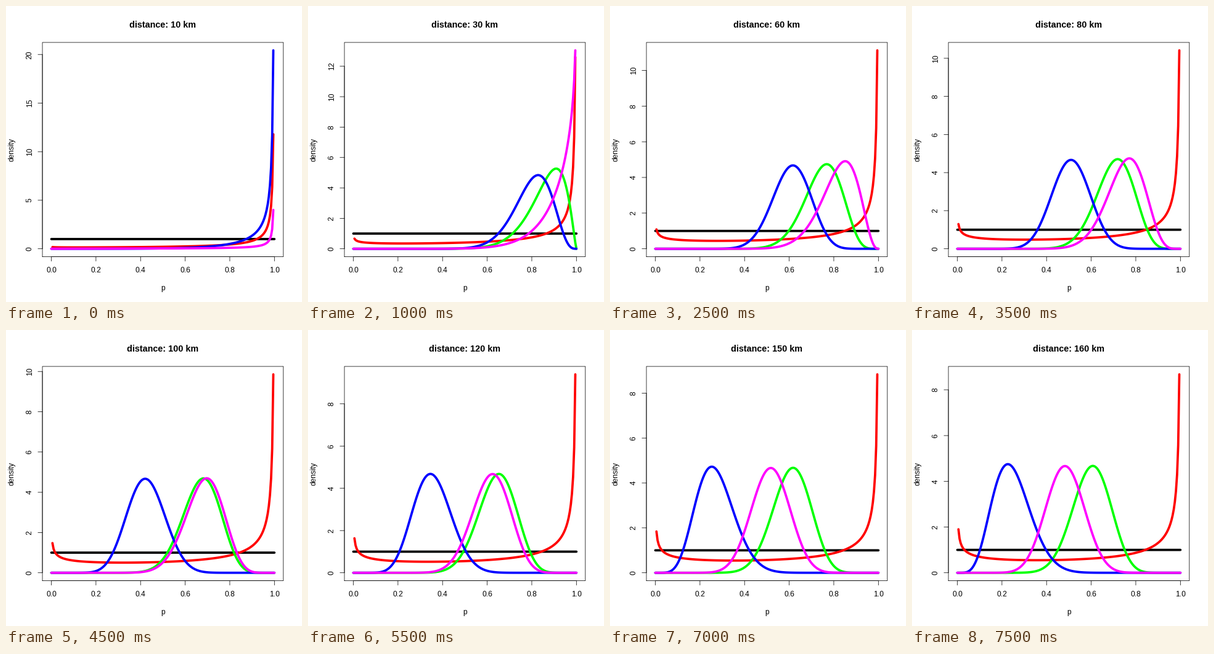
Write a matplotlib script that moves like this. It is 480 px wide and 480 px high and loops after 8000 ms.

```python
import math

import matplotlib.pyplot as plt
import numpy as np
from matplotlib.animation import FuncAnimation

plt.rcParams["font.family"] = "Liberation Sans"
plt.rcParams["path.simplify"] = False

SIZE = 480
FRAMES = 16
LEFT, RIGHT, TOP, BOTTOM = 59.04, 449.76, 59.04, 406.56
LINE = 14.4            # height of one margin line
TICK = LINE / 2
PAD = 0.04 / 1.08      # share of the box left empty at each end of an axis
VARIANCE = 0.007
P = np.linspace(0, 1, 201)

# 72 dpi makes one point equal one pixel
fig = plt.figure(figsize=(SIZE / 72, SIZE / 72), dpi=72, facecolor="white")
ax = fig.add_axes([0, 0, 1, 1])


def px(x):
    return LEFT + (RIGHT - LEFT) * (PAD + x * (1 - 2 * PAD))


def py(y, top):
    return BOTTOM - (BOTTOM - TOP) * (PAD + y / top * (1 - 2 * PAD))


def beta_pdf(a, b):
    """Beta density on P; infinite ends become gaps."""
    if min(a, b) <= 0:
        return np.full_like(P, np.nan)
    scale = math.exp(math.lgamma(a + b) - math.lgamma(a) - math.lgamma(b))
    with np.errstate(divide="ignore"):
        y = scale * P ** (a - 1) * (1 - P) ** (b - 1)
    return np.where(np.isfinite(y), y, np.nan)


def beta_mean(mean):
    n = mean * (1 - mean) / VARIANCE - 1
    return beta_pdf(n * mean, n * (1 - mean))


def densities(distance):
    d = distance - 5
    wide = 1.014 - 0.0735 * math.log(d)
    return [
        ("#000000", np.ones_like(P)),
        ("#ff0000", beta_pdf(wide, 1 - wide)),
        ("#00ff00", beta_mean(1.3145 - 0.1415 * math.log(d))),
        ("#0000ff", beta_mean(math.exp(-0.009 * d))),
        ("#ff00ff", beta_mean(1 - d / 300)),
    ]


def stroke(x, y, color="black", width=0.75):
    ax.plot(x, y, color=color, lw=width, snap=False,
            solid_capstyle="round", solid_joinstyle="round")


def label(x, y, text, angle=0, size=12, weight="normal"):
    ax.text(x, y, text, size=size, weight=weight, rotation=angle,
            rotation_mode="anchor", ha="center", va="baseline")


def draw_x_axis():
    stroke([px(0), px(1)], [BOTTOM, BOTTOM])
    for v in np.arange(6) / 5:
        stroke([px(v), px(v)], [BOTTOM, BOTTOM + TICK])
        label(px(v), BOTTOM + 1.8 * LINE, f"{v:.1f}")
    label((LEFT + RIGHT) / 2, BOTTOM + 3.8 * LINE, "p")


def draw_y_axis(top):
    step = 5 if top > 17 else 2
    ticks = [v for v in range(0, 30, step) if v <= top * 1.04]
    stroke([LEFT, LEFT], [py(0, top), py(ticks[-1], top)])
    for v in ticks:
        y = py(v, top)
        stroke([LEFT - TICK, LEFT], [y, y])
        label(LEFT - 1.2 * LINE, y, str(v), angle=90)
    label(LEFT - 3.2 * LINE, (TOP + BOTTOM) / 2, "density", angle=90)


def update(frame):
    distance = 10 * (frame + 1)
    curves = densities(distance)
    top = max(np.nanmax(y) for _, y in curves if not np.isnan(y).all())

    ax.clear()
    ax.set_axis_off()
    ax.set_xlim(0, SIZE)
    ax.set_ylim(SIZE, 0)
    for color, y in curves:
        stroke(px(P), py(y, top), color, 3.75)
    stroke([LEFT, RIGHT, RIGHT, LEFT, LEFT], [BOTTOM, BOTTOM, TOP, TOP, BOTTOM])
    draw_x_axis()
    draw_y_axis(top)
    label((LEFT + RIGHT) / 2, 35, f"distance: {distance} km",
          size=14.4, weight="bold")
    return ax.get_children()


anim = FuncAnimation(fig, update, frames=FRAMES, init_func=lambda: update(0),
                     interval=500, repeat=True, repeat_delay=0, blit=False)
plt.show()
```
